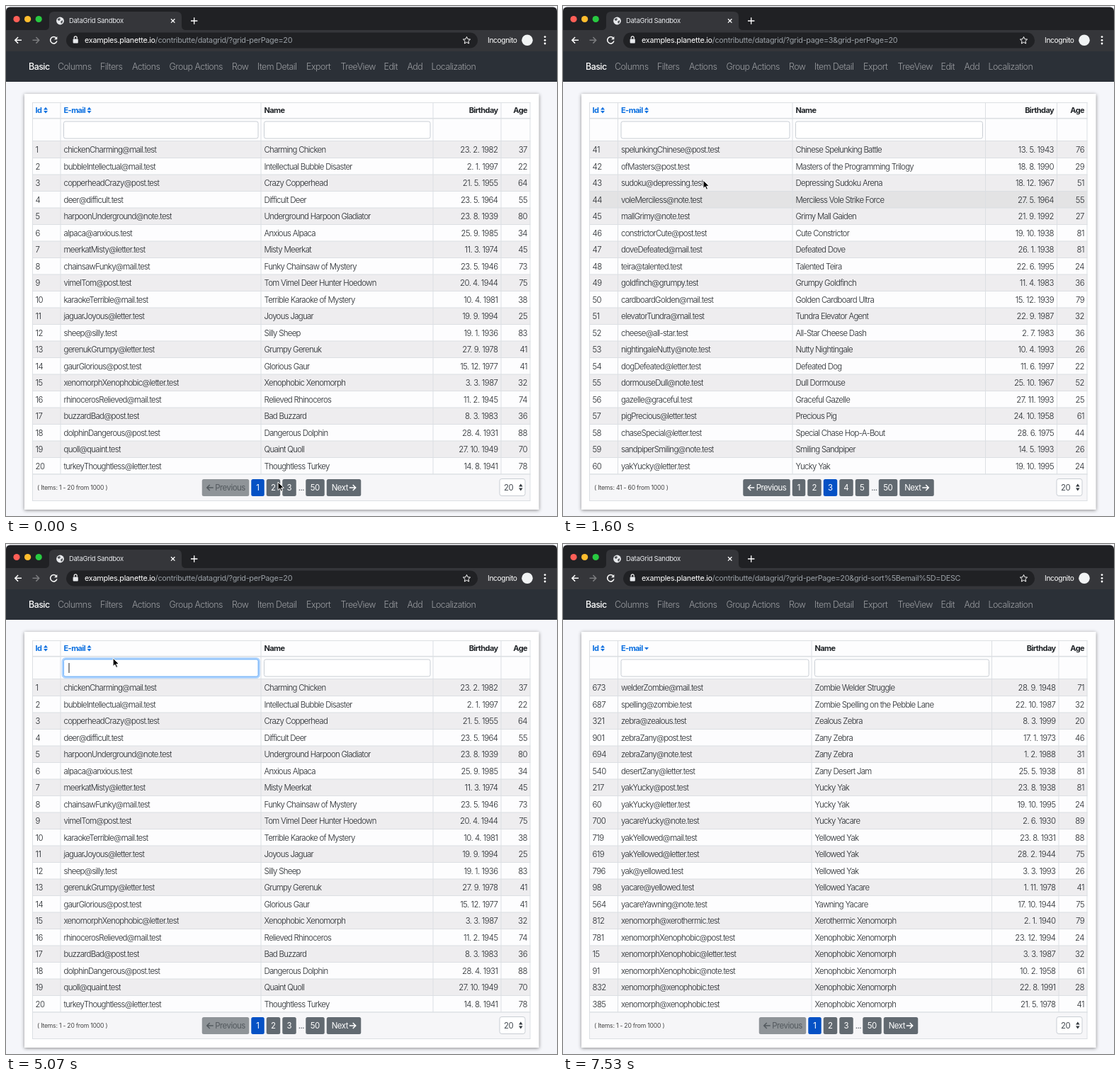
An HTML page that plays this animation: 778x720 px, repeating every 7.59 s.

```html
<!DOCTYPE html>
<html lang="en">
<head>
<meta charset="utf-8">
<title>DataGrid Sandbox</title>
<style>
html, body { margin: 0; width: 100%; height: 100%; overflow: hidden; background: #f5f6fa; }
svg { display: block; width: 778px; height: 720px; }
text { font: 300 11.4px Inter, sans-serif; letter-spacing: -.5px; fill: #212529; white-space: pre; }
.cell { letter-spacing: -.68px; }
.head { font-size: 11px; font-weight: 700; letter-spacing: -.6px; }
.link { fill: #0a6fe0; }
.nav { font-size: 12.4px; fill: #9b9da1; }
.nav.on { font-weight: 500; fill: #fff; }
.btn { font-weight: 400; fill: #fff; }
.off { font-weight: 400; fill: #53595e; }
.form { font-weight: 400; fill: #444b52; }
.note { font-size: 8.6px; font-weight: 400; letter-spacing: -.2px; fill: #444; }
.tab { font-size: 9.5px; font-weight: 400; letter-spacing: -.3px; fill: #e8eaed; }
.url { font-size: 10.8px; font-weight: 400; letter-spacing: -.27px; fill: #9aa0a6; }
.inc { font-size: 10.2px; font-weight: 400; letter-spacing: -.35px; fill: #fff; }
.status { font-size: 9.1px; font-weight: 400; letter-spacing: -.17px; fill: #a4a8ad; }
.panel { filter: drop-shadow(0 1.5px 2.5px rgba(0, 0, 0, .45)); }
.ico { fill: none; stroke: #fff; stroke-width: 1.5; }
.ico.dim { stroke: #53595e; }
</style>
</head>
<body>
<svg id="stage" viewBox="0 0 778 720"></svg>
<script>
const LOOP = 7590, ROW = 23.5, TOP = 191;
const LINE = '#dcdfe3', GRAY = '#626a71', DARK = '#474d53', BLUE = '#0551c5';
const hosts = { y: 'mail.test', h: 'letter.test', s: 'post.test', g: 'note.test' };

// Each line: [id] host-letter name birthday
const pageOne = `y Charming Chicken 23.2.1982
y Intellectual Bubble Disaster 2.1.1997
s Crazy Copperhead 21.5.1955
d Difficult Deer 23.5.1964
g Underground Harpoon Gladiator 23.8.1939
d Anxious Alpaca 25.9.1985
h Misty Meerkat 11.3.1974
y Funky Chainsaw of Mystery 23.5.1946
s Tom Vimel Deer Hunter Hoedown 20.4.1944
y Terrible Karaoke of Mystery 10.4.1981
h Joyous Jaguar 19.9.1994
d Silly Sheep 19.1.1936
h Grumpy Gerenuk 27.9.1978
s Glorious Gaur 15.12.1977
h Xenophobic Xenomorph 3.3.1987
y Relieved Rhinoceros 11.2.1945
s Bad Buzzard 8.3.1983
s Dangerous Dolphin 28.4.1931
d Quaint Quoll 27.10.1949
h Thoughtless Turkey 14.8.1941`;
const pageTwo = `y Ebony Bass Temple 15.9.1956
g Uptight Unicorn 24.4.1998
y Inbred Blood Conspiracy 23.3.1960
h Real Thunder Saga 6.12.1940
d Hungry Hummingbird 15.12.1976
h Good Goose 23.4.1939
s Unusual Unicorn 28.4.1939
g Aggressive Angelfish 12.3.1951
s Beautiful Boar 7.7.1987
g Go Go Pogo All-Stars 10.5.2000
h Rock 'n' Roll Metal Assassins 21.3.1966
y Dr. Spelunking Kingdom 18.9.1999
h Amused Alpaca 6.8.1941
s World of Bubble Gone Wild 11.10.1969
g Delightful Dove 3.4.1989
g Anxious Ant 27.10.1986
y Big-Time Chef Blast 25.5.1970
h Rural Pelican Journey 6.1.1989
g Dynamite Go-Kart Superstar 17.4.1951
d Sonic Monster of Magic 13.2.1963`;
const pageThree = `s Chinese Spelunking Battle 13.5.1943
s Masters of the Programming Trilogy 18.8.1990
d Depressing Sudoku Arena 18.12.1967
g Merciless Vole Strike Force 27.5.1964
g Grimy Mall Gaiden 21.9.1992
s Cute Constrictor 19.10.1938
y Defeated Dove 26.1.1938
d Talented Teira 22.6.1995
d Grumpy Goldfinch 11.4.1983
y Golden Cardboard Ultra 15.12.1939
y Tundra Elevator Agent 22.9.1987
d All-Star Cheese Dash 2.7.1983
g Nutty Nightingale 10.4.1993
h Defeated Dog 11.6.1997
g Dull Dormouse 25.10.1967
d Graceful Gazelle 27.11.1993
h Precious Pig 24.10.1958
h Special Chase Hop-A-Bout 28.6.1975
g Smiling Sandpiper 14.5.1993
h Yucky Yak 19.10.1995`;
const found = `103 d Testy Tiger 25.8.1958
380 g Testy Teira 1.4.1933
950 y Testy Tapir 4.1.1934
995 h Testy Tern 13.7.1943`;
const ascending = `489 h 3D Amish Solid 2.12.1986
492 s 8-Bit Paintball Fiesta 28.6.1950
184 h 8-Bit Mud World 6.2.1939
582 s A Fox and His Cup Strikes Again 10.5.1945
874 d Adorable Addax 17.6.1931
645 g Adorable Anteater 21.2.1937
142 d Adventurous Aardvark 27.10.1945
635 y Adventurous Addax 5.8.1986
236 s Adventurous Albatross 10.10.1949
803 g Adventurous Angelfish 18.10.1996
655 g Adventurous Armadillo 16.8.1961
608 y Adventurous Armadillo 8.1.1972
365 d Aero Glider Assault 6.11.1942
748 d Aero Outlaw of Mystery 10.9.1982
242 g Aero Shopping Unit 22.2.1971
638 g Aggressive Alpaca 17.8.1987
28 g Aggressive Angelfish 12.3.1951
165 g Aggressive Antelope 9.11.1945
253 d Agreeable Anteater 7.5.1974
627 y Agreeable Alligator 8.6.1967`;
const descending = `673 y Zombie Welder Struggle 28.9.1948
687 d Zombie Spelling on the Pebble Lane 22.10.1987
321 d Zealous Zebra 8.3.1999
901 s Zany Zebra 17.1.1973
694 g Zany Zebra 1.2.1988
540 h Zany Desert Jam 25.5.1938
217 s Yucky Yak 23.8.1938
60 h Yucky Yak 19.10.1995
700 g Yucky Yacare 2.6.1930
719 y Yellowed Yak 23.8.1931
619 h Yellowed Yak 28.2.1944
796 d Yellowed Yak 3.3.1993
98 d Yellowed Yacare 1.11.1978
564 g Yawning Yacare 17.10.1944
812 d Xerothermic Xenomorph 2.1.1940
781 s Xenophobic Xenomorph 23.12.1994
15 h Xenophobic Xenomorph 3.3.1987
91 g Xenophobic Xenomorph 10.2.1958
832 d Xenophobic Xenomorph 22.8.1991
385 d Xenophobic Xenomorph 21.5.1978`;

const per = 'grid-perPage=20';
const views = [
  { rows: pageOne, from: 1, page: 1, url: per, cols: [77, 360, 603, 699] },
  { rows: pageTwo, from: 21, page: 2, url: 'grid-page=2&' + per, cols: [81, 351, 588.5, 694] },
  { rows: pageThree, from: 41, page: 3, url: 'grid-page=3&' + per, cols: [77.5, 324, 596.5, 697.5] },
  { rows: found, from: 1, url: per + '&grid-filter%5Bemail%5D=test', cols: [87, 334, 580.5, 690.5] },
  { rows: ascending, from: 1, page: 1, sort: 'asc', url: per + '&grid-sort%5Bemail%5D=ASC', cols: [81, 353, 599, 697.5] },
  { rows: descending, from: 1, page: 1, sort: 'desc', url: per + '&grid-sort%5Bemail%5D=DESC', cols: [77.5, 351, 605.5, 700] }
];

const esc = s => String(s).replace(/&/g, '&amp;');
const text = (x, y, s, cls = '', more = '') => `<text x="${x}" y="${y}" class="${cls}" ${more}>${esc(s)}</text>`;
const right = (x, y, s, cls) => text(x, y, s, cls, 'text-anchor="end"');
const rect = (x, y, w, h, fill, more = '') => `<rect x="${x}" y="${y}" width="${w}" height="${h}" fill="${fill}" ${more}/>`;
const path = (d, more) => `<path d="${d}" ${more}/>`;
const circle = (x, y, r, fill) => `<circle cx="${x}" cy="${y}" r="${r}" fill="${fill}"/>`;
const hline = (y, w = 1) => rect(37, y - w / 2, 703.5, w, LINE);

function email(host, name) {
  const [a, b] = name.toLowerCase().replace(/'/g, '').split(' ');
  return hosts[host] ? b + a[0].toUpperCase() + a.slice(1) + '@' + hosts[host] : `${b}@${a}.test`;
}

function age(date) {
  const [d, m, y] = date.split('.').map(Number);
  return 2019 - y - (m * 100 + d > 1115 ? 1 : 0);
}

function sortIcon(x, sort) {
  const up = y => path(`M${x} ${y}h6l-3-3.6z`, 'class="link"');
  const down = y => path(`M${x} ${y}h6l-3 3.6z`, 'class="link"');
  return sort === 'asc' ? up(149) : sort === 'desc' ? down(146) : up(146.4) + down(147.9);
}

function pager(v, y) {
  const last = Math.max(3, v.page + 2), gap = 3;
  const items = [['Previous', 66.5]];
  for (let n = 1; n <= last; n++) items.push([n, n === 1 ? 18.5 : 19.5]);
  items.push(['...', 7.5], [50, 26.5], ['Next', 48.5]);
  const total = items.reduce((sum, i) => sum + i[1] + gap, -gap);
  let x = 389 - total / 2, out = '';
  for (const [label, w] of items) {
    if (label === '...') out += text(x, y + 16, label, 'form');
    else {
      const off = label === 'Previous' && v.page === 1;
      const fill = off ? '#8f9498' : label === v.page ? BLUE : GRAY;
      const arrow = (ax, dir) => path(`M${ax} ${y + 12}h${9 * dir}m${-4 * dir}-4l${4 * dir} 4l${-4 * dir} 4`, `class="ico ${off ? 'dim' : ''}"`);
      out += rect(x, y, w, 24, fill, `rx="2.5" ${fill === GRAY ? `data-x="${x}"` : ''}`);
      if (label === 'Previous') out += arrow(x + 16, -1) + text(x + 18.5, y + 16, label, off ? 'off' : 'btn');
      else if (label === 'Next') out += text(x + 7, y + 16, label, 'btn') + arrow(x + 32, 1);
      else out += text(x + w / 2 - .3, y + 16, label, 'btn', 'text-anchor="middle"');
    }
    x += w + gap;
  }
  return out;
}

function build(v) {
  const [c1, c2, c3, c4] = v.cols;
  const lines = v.rows.split('\n'), end = TOP + lines.length * ROW, bottom = end + 37.5;
  v.count = lines.length;
  let out = rect(26, 124, 726.5, bottom - 111.5, '#fff', 'class="panel"') + rect(37, 136, 703.5, bottom - 136, '#fdfdfe');
  lines.forEach((line, i) => {
    if (i % 2 === 0) out += rect(37, TOP + i * ROW, 703.5, ROW, '#eeedef');
  });
  out += rect(37, 0, 703.5, ROW, 'rgba(0,0,0,.1)', 'class="hover"');
  lines.forEach((line, i) => {
    const [, id, host, name, date] = line.match(/^(?:(\d+) )?(\w) (.+) (\S+)$/);
    const y = TOP + i * ROW + 16.2;
    out += hline(TOP + (i + 1) * ROW) + text(41.5, y, id || v.from + i) + text(c1 + 4.5, y, email(host, name), 'cell') +
      text(c2 + 4.5, y, name, 'cell') + right(c4 - 4.5, y, date.replace(/\./g, '. ')) + right(736, y, age(date));
  });
  out += rect(37.5, end + .5, 702.5, 37, '#f6f6f8') + hline(136.5) + hline(158.7, 1.6) + hline(190.5) + hline(bottom) + hline(end);
  out += rect(37, 136, 1, bottom - 136, LINE) + rect(739.5, 136, 1, bottom - 136, LINE);
  for (const c of v.cols) out += rect(c - .5, 136, 1, end - 136, LINE);
  out += text(41.5, 151, 'Id', 'head link') + sortIcon(53, '') +
    `<g class="mail">${text(c1 + 4.5, 151, 'E-mail', 'head link') + sortIcon(c1 + 37.5, v.sort)}</g>` +
    text(c2 + 4.5, 151, 'Name', 'head') + right(c4 - 4.5, 151, 'Birthday', 'head') + right(736, 151, 'Age', 'head');
  for (const [a, b] of [[c1, c2], [c2, c3]])
    out += rect(a + 4.5, 163, b - a - 8.5, 24, '#fff', 'rx="2.5" stroke="#c9ced4"');
  out += text(44, end + 22, `( Items: ${v.from} - ${v.from + v.count - 1} from ${v.page ? 1000 : 4} )`, 'note');
  out += rect(697, end + 6.5, 36, 24, '#fff', 'rx="3" stroke="#c9ced4"') + text(703, end + 22.5, '20', 'form') +
    path(`M724 ${end + 17.5}h5.6l-2.8-4zm0 2h5.6l-2.8 4z`, 'fill="#343a40"');
  out += v.page ? pager(v, end + 7)
    : rect(629, end + 7, 64.5, 24.5, '#d7303f', 'rx="2.5"') + text(635.3, end + 23.3, 'Reset filter', 'btn');
  const url = `<text x="111" y="52.3" class="url"><tspan fill="#fff">examples.planette.io</tspan>${esc('/contributte/datagrid/?' + v.url)}</text>`;
  return `<g class="view">${out + url}</g>`;
}

function chrome() {
  let out = path('M0 64V7a5.5 5.5 0 0 1 5.5-5.5h767a5.5 5.5 0 0 1 5.5 5.5V64z', 'fill="#202124"');
  out += path('M55 34q6 0 6-6V15q0-7 7-7h173q7 0 7 7v13q0 6 6 6z', 'fill="#35363a"') + rect(0, 34, 778, 30, '#35363a');
  ['#ff5f57', '#ffbd2e', '#28ca41'].forEach((c, i) => { out += circle(15 + i * 15.6, 18.5, 4.6, c); });
  out += circle(76.5, 21, 5.4, '#e8eaed') + path('M73 18l3-1 1 2-2 2-2-1zM77 22l3-2v3l-2 2z', 'fill="#55585c"') + text(89, 24.4, 'DataGrid Sandbox', 'tab');
  out += path('M233 18.2l5.4 5.4m0-5.4l-5.4 5.4M261 21h9.4m-4.7-4.7v9.4', 'class="ico" style="stroke-width:1.3"');
  out += path('M22 48.3h-9.2m4.3-4.3l-4.3 4.3l4.3 4.3', 'class="ico"') + path('M37.5 48.3h9.2m-4.3-4.3l4.3 4.3l-4.3 4.3', 'class="ico" opacity=".35"');
  out += path('M71 45.2a4.7 4.7 0 1 0 .9 4.2', 'class="ico"') + path('M72.3 43v4.2h-4.2z', 'fill="#fff"');
  out += rect(85, 37.5, 581, 22, '#202124', 'rx="11"') + rect(94.6, 46.5, 7.2, 6, '#e8eaed', 'rx="1"') +
    path('M96.2 46.5v-1.6a2 2 0 0 1 4 0v1.6', 'class="ico" style="stroke-width:1.1"');
  out += path('M650.5 43.4l1.5 3.3 3.6.4-2.7 2.4.8 3.5-3.2-1.8-3.2 1.8.8-3.5-2.7-2.4 3.6-.4z', 'class="ico" style="stroke-width:1"');
  out += text(680, 52, 'Incognito', 'inc') + circle(736, 48.3, 7.8, '#f1f3f4');
  for (const y of [43.6, 48.3, 53]) out += circle(761, y, 1.4, '#fff');
  out += rect(0, 64, 778, 43, '#2b3037');
  const nav = { Basic: 32, Columns: 73, Filters: 133, Actions: 178, 'Group Actions': 230.5, Row: 319, 'Item Detail': 355,
    Export: 424, TreeView: 472.5, Edit: 533.5, Add: 566.5, Localization: 600.5 };
  for (const s in nav) out += text(nav[s], 90, s, 'nav' + (s === 'Basic' ? ' on' : ''));
  return out;
}

const focusLayer = `<g id="focus"><rect id="ring" y="163" height="24" rx="2.5" fill="#fff" stroke="#80bdff"/>
  <rect id="glow" y="161.5" height="27" rx="4" fill="none" stroke="#007bff" stroke-opacity=".32" stroke-width="2.6"/>
  ${text(0, 179, '', 'form', 'id="typed"')}<rect id="caret" y="168" width="1" height="14" fill="#222"/></g>`;
const statusLayer = `<g id="status">${path('M0 706h254q4 0 4 4v10H0z', 'fill="#202124"') + text(4.5, 716.3, '', 'status', 'id="tip"')}</g>`;
const edge = 'stroke="#fff" stroke-width="1" stroke-linejoin="round"';
const cursors = `<g id="cursor">
  ${path('M0 0v11.5l2.7-2.4 1.8 4.1 2-.9-1.8-4h3.7z', 'id="arrow" fill="#000" ' + edge)}
  ${path('M-1 1q1-1.4 2 0v4.5q3-.6 6 1.4v3q0 2-1.2 4H.4Q-1.6 11-4.4 8.3q.4-1.8 3.4.4z', 'id="hand" fill="#fff" stroke="#000" stroke-width="1.1" stroke-linejoin="round"')}
  ${path('M-2.5-6q2 0 2.5 1.2q.5-1.2 2.5-1.2M0-5V6M-2.5 7q2 0 2.5-1.2q.5 1.2 2.5 1.2M-1.5 2.2h3', 'id="beam" fill="none" stroke="#000" stroke-width="1.2"')}
</g>`;

const stage = document.getElementById('stage');
stage.innerHTML = rect(0, 0, 778, 720, '#f5f6fa') + chrome() + views.map(build).join('') + focusLayer + statusLayer + cursors;
const $ = id => document.getElementById(id);
const groups = [...stage.querySelectorAll('.view')];
const show = (el, on) => el.setAttribute('display', on ? 'inline' : 'none');
const set = (el, attrs) => { for (const k in attrs) el.setAttribute(k, attrs[k]); };

// [start, value] steps
const viewAt = [[0, 0], [530, 1], [1130, 2], [3130, 3], [4730, 0], [5670, 4], [6600, 5]];
const typedAt = [[0, ''], [2670, 't'], [2740, 'te'], [2800, 'tes'], [3000, 'test'], [3930, 'tes'], [4000, 'te'], [4130, 't'], [4270, '']];
const shapeAt = [[0, 'arrow'], [70, 'hand'], [1270, 'arrow'], [1900, 'beam'], [2670, ''], [4740, 'beam'], [4880, 'arrow'],
  [5330, 'hand'], [7130, 'arrow'], [7500, '']];
const caretAt = [[0, 0], [2030, 1], [2530, 0], [2670, 1], [3530, 0], [4000, 1], [4530, 0], [4670, 1], [5170, 0]];
const moves = [[0, 384, 672], [140, 379, 677], [680, 379, 679], [800, 388, 681], [1250, 388, 681], [1600, 198, 246],
  [1950, 212, 177], [4740, 212, 177], [5350, 104, 149], [7070, 104, 149], [7490, 668, 84], [LOOP, 668, 84]];

const at = (steps, t) => steps.filter(s => s[0] <= t).pop()[1];
function pos(t) {
  const i = Math.max(1, moves.findIndex(m => m[0] > t));
  const [t0, x0, y0] = moves[i - 1], [t1, x1, y1] = moves[i];
  const u = Math.max(0, (t - t0) / (t1 - t0)), k = u * u * (3 - 2 * u);
  return [x0 + (x1 - x0) * k, y0 + (y1 - y0) * k];
}

function draw(t) {
  const n = at(viewAt, t), v = views[n], g = groups[n];
  groups.forEach((el, i) => show(el, i === n));
  const shape = at(shapeAt, t), [x, y] = pos(t);

  // Row highlight trails the pointer slightly
  const row = Math.floor((pos(Math.max(0, t - 60))[1] - TOP) / ROW);
  const hover = g.querySelector('.hover');
  hover.setAttribute('y', TOP + row * ROW);
  show(hover, shape && row >= 0 && row < v.count);
  for (const b of g.querySelectorAll('[data-x]')) {
    const bx = +b.dataset.x, on = shape === 'hand' && y > 667 && x >= bx && x <= bx + b.width.baseVal.value;
    b.setAttribute('fill', on ? DARK : GRAY);
  }
  const over = shape === 'hand' && y < 160;
  set(g.querySelector('.mail'), { style: over ? 'text-decoration:underline;filter:brightness(.78)' : '' });

  const focus = t >= 2030 && t < 5470;
  show($('focus'), focus);
  if (focus) {
    const left = v.cols[0] + 4.5, w = v.cols[1] - v.cols[0] - 8.5;
    set($('ring'), { x: left, width: w });
    set($('glow'), { x: left - 1.5, width: w + 3, opacity: Math.min(1, (t - 2030) / 150) });
    $('typed').textContent = at(typedAt, t);
    set($('typed'), { x: left + 7.5 });
    set($('caret'), { x: left + 7 + $('typed').getComputedTextLength() });
    show($('caret'), at(caretAt, t));
  }

  show($('status'), (t >= 140 && t < 1330) || (t >= 5500 && t < 7200));
  $('tip').textContent = 'https://examples.planette.io/contributte/datagrid/?grid-' + (t < 3000 ? 'pa...' : 'so...');

  for (const s of ['arrow', 'hand', 'beam']) show($(s), s === shape);
  set($('cursor'), { transform: `translate(${x} ${y})` });
}

function tick(now) {
  draw(now % LOOP);
  requestAnimationFrame(tick);
}
draw(0);
requestAnimationFrame(tick);
</script>
</body>
</html>
```
